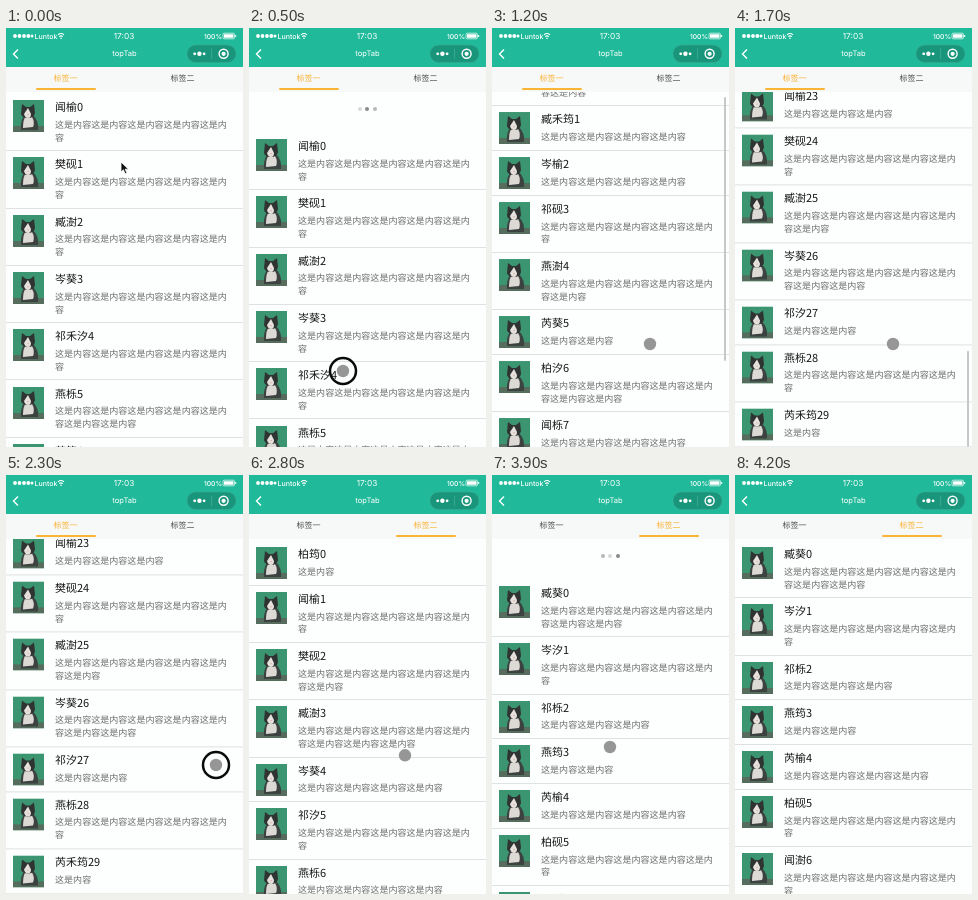
An HTML page for the animation above (4.3 s loop, 237 px wide and 419 px high).

```html
<!DOCTYPE html>
<html lang="en">
<head>
<meta charset="utf-8">
<title>topTab</title>
<style>
  html, body { margin: 0; width: 100%; height: 100%; overflow: hidden; background: #fff; }
  #stage { position: absolute; left: 0; top: 0; width: 237px; height: 419px; overflow: hidden; background: #fdfefe;
    font-family: "Noto Sans CJK SC", "Noto Sans CJK JP", "Noto Sans CJK", sans-serif; text-rendering: geometricPrecision; }
  #stage svg { position: absolute; overflow: visible; }
  #head { left: 0; top: 0; }
  #head text { fill: #fff; font-family: Inter, Roboto, sans-serif; }
  #tabs { position: absolute; left: 0; top: 39px; width: 237px; height: 25px; background: #f7f8f8; }
  #tabs span { position: absolute; top: 4.7px; width: 117px; text-align: center; font-size: 8px; line-height: 13px; color: #4c4c4c; }
  #tabs span.on { color: #f9b233; font-weight: 500; }
  #bar { position: absolute; left: 30px; top: 21.3px; width: 60px; height: 2px; border-radius: 1px; background: #fbb534; }
  #view { position: absolute; left: 0; top: 64px; width: 237px; height: 355px; overflow: hidden; }
  .list { position: absolute; left: 0; top: 2px; width: 237px; background: #fdfefe; }
  .row { position: absolute; left: 0; width: 237px; box-sizing: border-box; border-bottom: 1px solid #dfe2e2; }
  .row svg { left: 7px; top: 6px; }
  .row b { position: absolute; left: 49px; top: 5px; font-size: 11px; line-height: 16px; font-weight: 500; color: #161616; white-space: nowrap; }
  .row p { position: absolute; left: 49px; top: 24.9px; width: 176px; margin: 0; font-size: 9.05px; line-height: 12.8px; color: #6c6c6c; }
  #dots i { position: absolute; top: 15px; width: 4px; height: 4px; border-radius: 50%; }
  #thumb { position: absolute; left: 232px; top: 38px; width: 2px; border-radius: 1px; background: #c6c8c8; }
</style>
</head>
<body>
<div id="stage">
  <div id="view">
    <div id="dots"><i style="left:109px"></i><i style="left:116px"></i><i style="left:124px"></i></div>
    <div id="lists"></div>
  </div>
  <div id="tabs"><span style="left:1px">标签一</span><span style="left:118px">标签二</span><div id="bar"></div></div>
  <div id="thumb"></div>
  <svg id="head" width="237" height="39">
    <rect width="237" height="39" fill="#20ba9a"/>
    <g fill="#fff">
      <circle cx="9" cy="8" r="1.9"/><circle cx="13.5" cy="8" r="1.9"/><circle cx="18" cy="8" r="1.9"/>
      <circle cx="22.3" cy="8" r="1.9"/><circle cx="26" cy="8" r="1.5"/>
    </g>
    <text x="28.5" y="10.5" font-size="7" font-weight="500">Luntok</text>
    <g fill="none" stroke="#fff" stroke-width="1.1">
      <path d="M52 6.8q3-2.6 6 0M53.2 8.7q1.8-1.6 3.6 0"/>
      <path d="M12 21.5L7.5 26l4.5 4.5" stroke-width="1.4"/>
      <rect x="217" y="5.2" width="11.5" height="5.6" rx="1.2" stroke-width=".7"/>
    </g>
    <circle cx="55" cy="10.3" r=".8" fill="#fff"/>
    <text x="118" y="10.7" font-size="8.3" text-anchor="middle">17:03</text>
    <text x="198" y="10.6" font-size="6.7" font-weight="500">100%</text>
    <path d="M218 6.2h9.5v3.6h-9.5zM229.2 7h1v2h-1z" fill="#fff"/>
    <text x="118.5" y="27.9" font-size="7.6" text-anchor="middle">topTab</text>
    <rect x="181" y="17" width="49" height="17.5" rx="8.7" fill="#19957c" stroke="#3aa890" stroke-width=".6"/>
    <path d="M205.6 20.5v10.5" stroke="#4bb09b" stroke-width=".7"/>
    <g fill="#fff">
      <circle cx="188.7" cy="25.8" r="1.4"/><circle cx="193.4" cy="25.8" r="2.2"/><circle cx="198.1" cy="25.8" r="1.4"/>
      <circle cx="217.6" cy="25.8" r="2.1"/>
    </g>
    <circle cx="217.6" cy="25.8" r="4.5" fill="none" stroke="#fff" stroke-width="1.4"/>
  </svg>
  <svg id="pointer" style="left:0;top:0" width="1" height="1">
    <path id="arrow" d="M0 0v10l2.4-2.2 1.7 3.9 1.8-.8-1.7-3.7h3.3z" fill="#111" stroke="#fff" stroke-width=".8"/>
    <circle id="disc" r="6.2" fill="#969696"/>
    <circle id="ring" r="13" fill="none" stroke="#0a0a0a" stroke-width="2.5"/>
  </svg>
</div>
<svg width="0" height="0" style="position:absolute">
  <symbol id="cat" viewBox="0 0 31 32">
    <rect width="31" height="32" fill="#3a9570"/>
    <rect y="26" width="31" height="6" fill="#566c5c"/>
    <path d="M8 30q-1-10 4-15h8q6 6 5 15z" fill="#3b4240"/>
    <path d="M10 28q0-9 3-12l6 1q3 5 1 10z" fill="#ddd9d4"/>
    <path d="M8 14L9 4l4 3h4l4-3 1 9q-1 5-7 5t-7-4z" fill="#2f3433"/>
    <path d="M15 8l3 6q0 4-3 4t-4-4z" fill="#e6e1dc"/>
    <path d="M14.2 14.3h1.8l-.9 1.1z" fill="#cf9a91"/>
  </symbol>
</svg>
<script>
const LOOP = 4300, ONE = 44.7, TWO = 57.3;
const VIEW = 381, TABS = 28; // the scroll area includes the sticky tabs
const $ = id => document.getElementById(id);

const family = [...'闻岑芮樊祁柏臧燕'], given = [...'榆汐砚栎澍筠葵'];
const personName = (i, seed, long) =>
  family[(i * 3 + seed) % 8] + (long ? '禾' : '') + given[(i * 2 + seed) % 7];

// Each digit is how often the phrase repeats in that row.
function makeList(counts, seed, longRows = []) {
  const el = document.createElement('div'), tops = [0];
  el.className = 'list';
  [...counts].forEach((n, i) => {
    const h = n > 4 ? TWO : ONE, row = document.createElement('div');
    row.className = 'row';
    row.style.cssText = `top:${tops[i]}px;height:${h}px`;
    row.innerHTML = `<svg width="31" height="32"><use href="#cat"/></svg>
      <b>${personName(i, seed, longRows.includes(i))}${i}</b><p>${'这是内容'.repeat(n)}</p>`;
    el.append(row);
    tops.push(tops[i] + h);
  });
  el.style.height = tops[tops.length - 1] + 'px';
  $('lists').append(el);
  const size = n => tops[n] + TABS;
  return { el, size, end: n => size(n) - VIEW };
}

const first = makeList('5555575624', 0, [4]);
const firstNew = makeList('644562745524132435214333567251', 3, [1, 29]);
const second = makeList('15684547365415562523', 5);
const secondNew = makeList('7532455624', 6);

const smooth = k => k * k * (3 - 2 * k);
const linear = k => k;
function at(keys, t, ease = smooth) {
  let i = 0;
  while (i < keys.length && keys[i][0] <= t) i++;
  if (!i) return keys[0][1];
  if (i === keys.length) return keys[i - 1][1];
  const [t0, a] = keys[i - 1], [t1, b] = keys[i];
  return a + (b - a) * ease((t - t0) / (t1 - t0));
}
const within = (t, a, b) => t >= a && t < b;

const scroll1 = [[1050, 0], [1200, 44], [1330, firstNew.end(10)], [1480, firstNew.end(20)], [1640, firstNew.end(30)]];
const scroll2 = [[2850, 0], [2950, second.end(10)], [3050, 420], [3120, 420], [3340, 0]];
const pull1 = [[150, 0], [450, 39], [650, 39], [850, 0]];
const pull2 = [[3550, 0], [3780, 39], [3920, 39], [4100, 0]];
const slide = [[2350, 0], [2650, 1]];
const px = [[0, 115], [150, 108], [450, 94], [650, 94], [1050, 158], [2100, 158], [2300, 210], [2600, 156], [3400, 156], [3550, 125], [3800, 118]];
const py = [[0, 134], [150, 146], [450, 343], [650, 343], [1050, 316], [2100, 316], [2300, 290], [2600, 280], [3400, 282], [3550, 150], [3800, 272]];

function place(list, shown, x, y) {
  list.el.style.visibility = shown ? 'visible' : 'hidden';
  list.el.style.transform = `translate(${x}px,${y}px)`;
}
const show = (id, on) => { $(id).style.display = on ? '' : 'none'; };

function draw(t) {
  const s = at(slide, t), x = -237 * s;
  const s1 = at(scroll1, t, linear), s2 = at(scroll2, t, linear);
  const p1 = at(pull1, t), p2 = at(pull2, t);
  const fresh1 = t >= 650, fresh2 = t >= 3900;
  place(first, !fresh1 && s < 1, x, p1);
  place(firstNew, fresh1 && s < 1, x, p1 - s1);
  place(second, !fresh2 && s > 0, x + 237, p2 - s2);
  place(secondNew, fresh2 && s > 0, x + 237, p2);

  $('bar').style.transform = `translateX(${117 * s}px)`;
  document.querySelectorAll('#tabs span').forEach((tab, i) => { tab.className = (s > .5) === (i > 0) ? 'on' : ''; });

  const greys = ['#d8d8d8', '#8a8a8a', '#b8b8b8'], step = Math.floor(t / 200);
  document.querySelectorAll('#dots i').forEach((dot, i) => { dot.style.background = greys[(i + step + 1) % 3]; });
  show('dots', p1 + p2 > 1);

  const one = t < 2300, list = one ? firstNew : second;
  const rows = one ? (t < 1330 ? 10 : t < 1480 ? 20 : 30) : (t < 2950 ? 10 : 20);
  const ratio = VIEW / list.size(rows);
  show('thumb', within(t, 1080, 2000) || within(t, 2860, 3550));
  $('thumb').style.height = VIEW * ratio + 'px';
  $('thumb').style.transform = `translateY(${(one ? s1 : s2) * ratio}px)`;

  $('pointer').style.transform = `translate(${at(px, t)}px,${at(py, t)}px)`;
  show('pointer', t < 4050);
  show('arrow', t < 150);
  show('disc', t >= 150);
  show('ring', within(t, 150, 650) || within(t, 2300, 2600) || within(t, 3550, 3900));
}

function tick() {
  draw(performance.now() % LOOP);
  requestAnimationFrame(tick);
}
tick();
</script>
</body>
</html>
```
